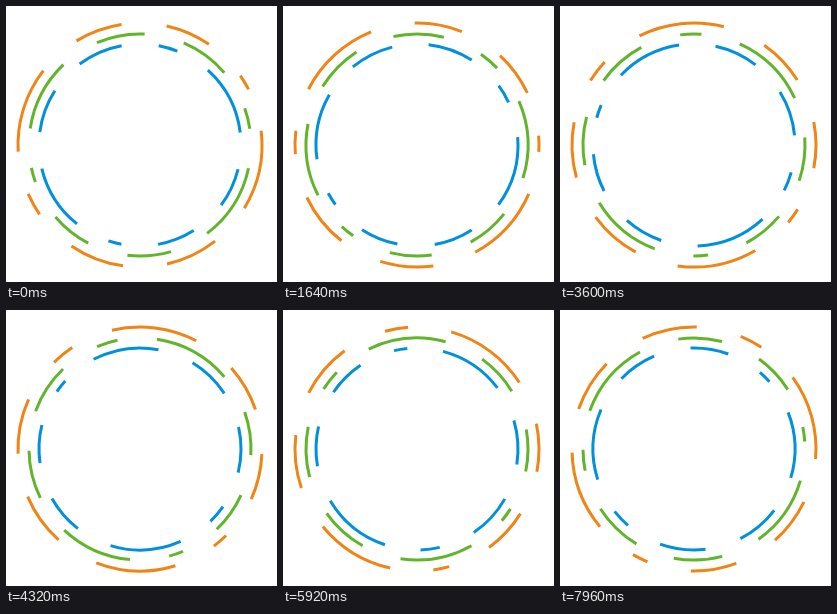
Recreate the animation shown at these times as an HTML page. Size 271 by 276 pixels, loop 8000 ms.

```html
<!DOCTYPE html>
<html lang="en">
<head>
<meta charset="utf-8">
<title>Dashed rings</title>
<style>
  html, body { margin: 0; width: 100%; height: 100%; overflow: hidden; background: #fff; }
  svg { display: block; width: 100%; height: 100%; }
</style>
</head>
<body>
<svg viewBox="0 0 271 276" fill="none" stroke-width="3"></svg>
<script>
const LOOP = 8000, STEP = 40, CX = 134, CY = 139;

// start and end of each dash, in degrees clockwise
const DASHES = [
  [0, 40.7], [61.7, 84.4], [105.7, 127.5], [148.4, 156],
  [176.4, 214.3], [235.1, 260.3], [281.1, 307.3], [328.5, 339.5]
];

// from: start angle clockwise from the top; speed: degrees per second
const RINGS = [
  { r: 122, color: '#ef8516', from: 266.9, speed: 18.48 },
  { r: 111, color: '#62b52b', from: 102.1, speed: -21.6 },
  { r: 101, color: '#0090dc', from: 42.2, speed: 26.4 }
];

const svg = document.querySelector('svg');

function point(r, deg) {
  const a = deg * Math.PI / 180;
  return `${(r * Math.sin(a)).toFixed(3)} ${(-r * Math.cos(a)).toFixed(3)}`;
}

for (const ring of RINGS) {
  const path = document.createElementNS('http://www.w3.org/2000/svg', 'path');
  path.setAttribute('stroke', ring.color);
  path.setAttribute('d', DASHES.map(([a, b]) =>
    `M${point(ring.r, a)}A${ring.r} ${ring.r} 0 0 1 ${point(ring.r, b)}`).join(''));
  ring.path = svg.appendChild(path);
}

function draw(ms) {
  const t = Math.floor((ms % LOOP) / STEP) * STEP / 1000;
  for (const { path, from, speed } of RINGS) {
    path.setAttribute('transform', `translate(${CX} ${CY}) rotate(${from + speed * t})`);
  }
}

const begin = performance.now();
function tick() {
  draw(performance.now() - begin);
  requestAnimationFrame(tick);
}
tick();
</script>
</body>
</html>
```
